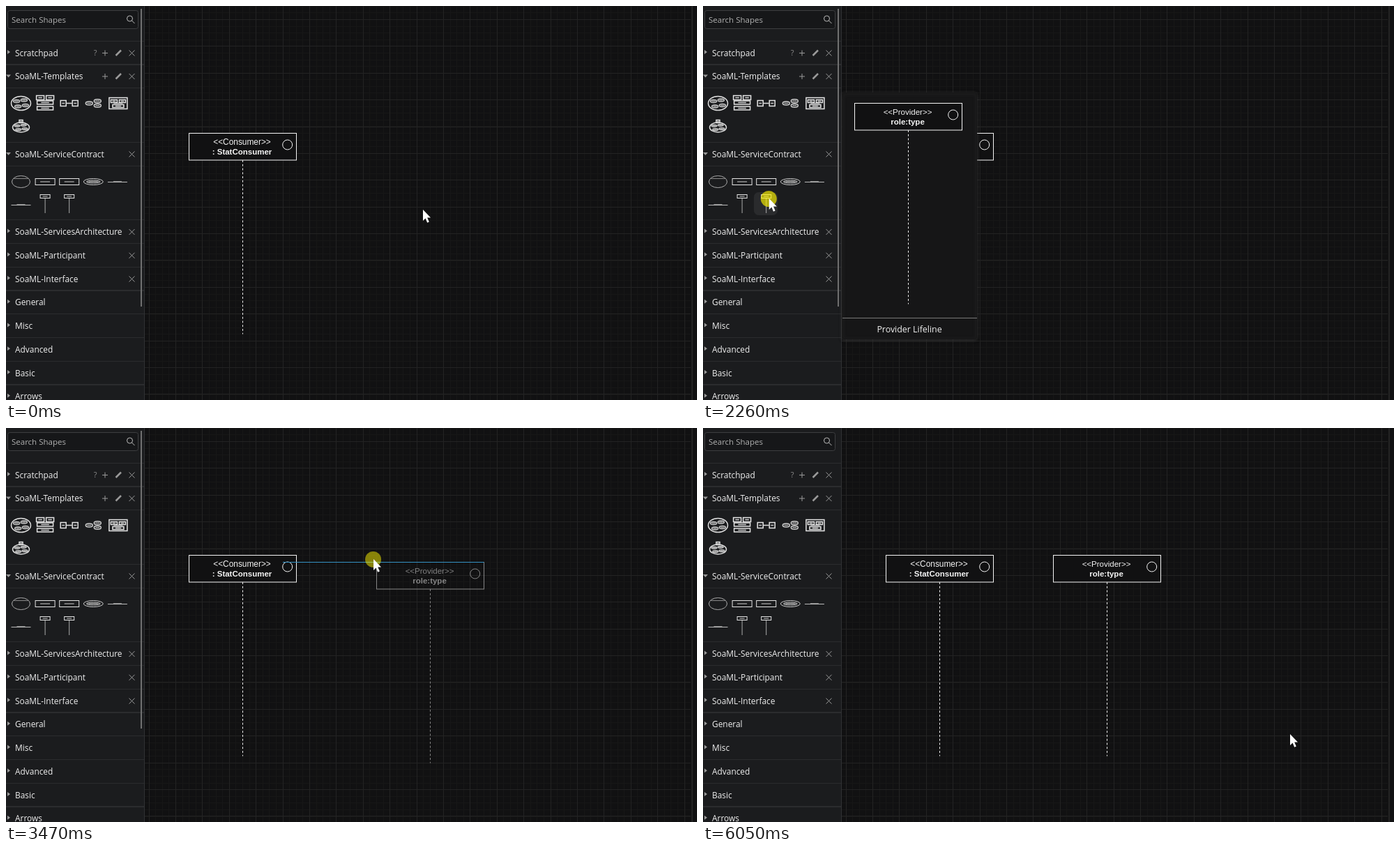
Animation of 991x565 px, one loop 7310 ms. Source, as an HTML page with a canvas:

```html
<!DOCTYPE html>
<html lang="en">
<head>
<meta charset="utf-8">
<style>
  html, body { margin: 0; width: 100%; height: 100%; overflow: hidden; background: #111; }
  canvas { display: block; }
</style>
</head>
<body>
<canvas id="stage" width="991" height="565"></canvas>
<script>
const ctx = document.getElementById('stage').getContext('2d');
const LOOP = 7310, GRID = 9.6, POPUP = 1730, PRESS = 2260, RELEASE = 5240, DESELECT = 5950;
const UI = '"Open Sans", "Noto Sans", sans-serif';
const DIAGRAM = '"Liberation Sans", Arial, sans-serif';
const INK = '#f4f4f4', DIM = '#9a9a9a', SELECT = '#29b6f2';

const linear = k => k;
const smooth = k => k * k * k * (k * (6 * k - 15) + 10);
const fastOut = k => 1 - (1 - k) ** 2.2;
const slowIn = k => k ** 1.5;

// Legs of motion: start, end, target x, target y, easing of x, easing of y
const pointerLegs = [
  [390, 1590, 94, 276, smooth],
  [PRESS, 3470, 527, 188, fastOut, slowIn],
  [3470, 3670, 543, 184, linear],
  [3740, 3930, 534, 184, linear],
  [4130, RELEASE, 497, 184, slowIn],
  [5420, 6050, 842, 439, smooth]
];
const ghostLegs = [
  [PRESS, 3470, 531.5, 192.3, fastOut, slowIn],
  [3470, 3670, 541.1, 182.7, linear],
  [4130, RELEASE, 502.7, 182.7, linear]
];

function travel(x, y, legs, t) {
  for (const [start, end, toX, toY, easeX, easeY = easeX] of legs) {
    const k = Math.min(1, Math.max(0, (t - start) / (end - start)));
    x += (toX - x) * easeX(k);
    y += (toY - y) * easeY(k);
  }
  return [x, y];
}

const snap = (v, origin) => origin + Math.round((v - origin) / GRID) * GRID;
const during = (t, start, end) => t >= start && t < end;

function rect(x, y, w, h, color) {
  ctx.fillStyle = color;
  ctx.fillRect(x, y, w, h);
}

function frame(x, y, w, h, color) {
  ctx.strokeStyle = color;
  ctx.strokeRect(x, y, w, h);
}

function panel(x, y, w, h, r, fill, stroke = fill) {
  ctx.beginPath();
  ctx.roundRect(x, y, w, h, r);
  ctx.fillStyle = fill;
  ctx.fill();
  ctx.strokeStyle = stroke;
  ctx.stroke();
}

function trace(pts) {
  ctx.beginPath();
  for (let i = 0; i < pts.length; i += 2) ctx.lineTo(pts[i], pts[i + 1]);
}

function line(color, ...pts) {
  trace(pts);
  ctx.strokeStyle = color;
  ctx.stroke();
}

function polygon(color, ...pts) {
  trace(pts);
  ctx.fillStyle = color;
  ctx.fill();
}

function oval(x, y, rx, ry, stroke, fill) {
  ctx.beginPath();
  ctx.ellipse(x, y, rx, ry, 0, 0, 7);
  if (fill) { ctx.fillStyle = fill; ctx.fill(); }
  if (stroke) { ctx.strokeStyle = stroke; ctx.stroke(); }
}

function label(str, x, y, font, color = '#f0f0f0', align = 'left') {
  ctx.font = font;
  ctx.fillStyle = color;
  ctx.textAlign = align;
  ctx.fillText(str, x, y);
}

function drawGrid() {
  rect(0, 0, 991, 565, '#111112');
  for (const [step, color] of [[GRID, '#171717'], [GRID * 4, '#232323']]) {
    for (let x = 205.1; x < 982; x += step) rect(Math.floor(x), 0, 1, 565, color);
    for (let y = 19.4 % step; y < 565; y += step) rect(199, Math.floor(y), 783, 1, color);
  }
  rect(983, 0, 2, 565, '#242424');
}

function drawHeader(name, y, tools = '', open = false) {
  for (const edge of [-17, 17]) rect(0, Math.floor(y + edge), 198, 1, '#2b2c2e');
  if (open) polygon(DIM, 0, y - 2, 7, y - 2, 3.5, y + 2);
  else polygon(DIM, 2, y - 4, 6, y - 1, 2, y + 2);
  label(name, 13, y + 4.5, '11.9px ' + UI);
  if (tools.includes('?')) label('?', 128, y + 4, '11px ' + UI, '#888', 'center');
  if (tools.includes('+')) {
    line(DIM, 138, y + .5, 146, y + .5);
    line(DIM, 142, y - 3.5, 142, y + 4.5);
    ctx.lineWidth = 2.5;
    line(DIM, 157.5, y + 4, 165, y - 3.5);
    ctx.lineWidth = 1;
  }
  if (tools.includes('x'))
    for (const d of [-4, 4]) line(DIM, 180.5 - d, y - 3.5, 180.5 + d, y + 4.5);
}

// Miniature of a text box, centred on x, y
function miniBox(x, y, w, h) {
  frame(x - w / 2, y - h / 2, w, h, '#e4e4e4');
  line('#ccc', x - w / 4, y, x + w / 4, y);
}

function miniOval(x, y, rx, ry) {
  oval(x, y, rx, ry, '#ccc');
  line('#aaa', x - rx * .6, y, x + rx * .6, y);
}

// Ellipse holding a ring of small linked bubbles
function cluster(x, y, rx, ry) {
  oval(x, y, rx, ry, '#ddd');
  for (let a = .6; a < 6; a += Math.PI / 2)
    miniOval(x + rx * .55 * Math.cos(a), y + ry * .55 * Math.sin(a), rx * .32, ry * .2);
}

function drawThumbnails() {
  const col = i => 21.5 + i * 34.6;
  ctx.lineWidth = 1.5;
  cluster(col(0), 139.5, 14, 10);
  cluster(col(0), 174, 12, 7);
  miniBox(col(0), 165.5, 5, 4);
  for (const side of [-1, 1]) {
    miniBox(col(1) + side * 7, 131.5, 11, 6);
    miniBox(col(1), 142.5 + side * 4, 23, 5);
    miniBox(col(2) + side * 8.5, 139.5, 8, 8);
    miniOval(col(3) + 6, 139.5 + side * 3.2, 5, 2.5);
    miniBox(col(4) + 1 + side * 6, 136.5, 9, 4);
  }
  line('#ddd', col(2) - 4, 139.5, col(2) + 4, 139.5);
  miniOval(col(3) - 6, 139.5, 5, 2.5);
  miniBox(col(4) + 1, 139.5, 26, 16);
  miniBox(col(4) + 1, 143.5, 16, 4);

  ctx.lineWidth = 1;
  oval(col(0), 252, 13, 8.5, '#aaa');
  line('#888', col(0) - 11, 247.5, col(0) + 11, 247.5);
  for (const i of [1, 2]) {
    miniBox(col(i), 252, 28, 9);
    miniBox(col(i), 273, 14, 5);
    line('#aaa', col(i), 276, col(i), 297);
  }
  miniOval(col(3), 252, 14, 4.5);
  miniOval(col(3), 252, 10, 2);
  for (const [x, y] of [[col(4), 252.5], [col(0), 285.5]]) {
    line('#bbb', x - 14, y, x + 14, y);
    line('#888', x - 6, y - 1, x + 6, y - 1);
  }
}

function drawSidebar(hover, scrollbar) {
  rect(0, 0, 198, 565, '#1b1c1e');
  rect(198, 0, 1, 565, '#303133');
  panel(2.5, 6.5, 187, 26, 3, '#161719', '#3d3e40');
  label('Search Shapes', 8, 24, '11.5px ' + UI, '#b0b0b0');
  oval(177.5, 18, 4, 4, '#bbb');
  line('#bbb', 180.5, 21, 184.5, 25);
  drawHeader('Scratchpad', 67, '?+x');
  drawHeader('SoaML-Templates', 100.5, '+x', true);
  drawHeader('SoaML-ServiceContract', 212, 'x', true);
  ['SoaML-ServicesArchitecture', 'SoaML-Participant', 'SoaML-Interface',
    'General', 'Misc', 'Advanced', 'Basic', 'Arrows'].forEach((name, i) =>
    drawHeader(name, 323.5 + i * 33.75, i < 3 ? 'x' : ''));
  if (hover) panel(73.5, 267.5, 33, 32, 6, '#2a2b2d');
  drawThumbnails();
  if (scrollbar) rect(193, 4, 2, 427, '#707070');
}

function drawLifeline(x, y, stereotype, name, size = 11.5, alpha = 1) {
  const left = Math.floor(x) + .5, top = Math.floor(y) + .5;
  ctx.save();
  ctx.globalAlpha = alpha;
  if (alpha === 1) rect(left, top, 154, 38.5, '#111112');
  frame(left, top, 154, 38.5, INK);
  oval(left + 141.2, top + 16.5, 7, 7, INK);
  label(`<<${stereotype}>>`, left + 76, top + 16, `${size}px ${DIAGRAM}`, INK, 'center');
  label(name, left + 76, top + 30.5, `bold 11.5px ${DIAGRAM}`, INK, 'center');
  ctx.setLineDash([GRID * .3, GRID * .3]);
  line(INK, left + 77, top + 38.6, left + 77, top + 288);
  ctx.restore();
}

const drawProvider = (x, y, alpha) => drawLifeline(x, y, 'Provider', 'role:type', 11.5, alpha);

function drawPreview() {
  ctx.save();
  ctx.shadowColor = 'rgba(70,70,70,.6)';
  ctx.shadowBlur = 5;
  ctx.shadowOffsetY = 1;
  panel(200, 124.5, 192.5, 353, 3, '#161617');
  ctx.restore();
  drawProvider(217, 139);
  rect(200, 447, 193, 1, '#777');
  label('Provider Lifeline', 296, 468, '12.4px ' + UI, '#f0f0f0', 'center');
}

function drawSelection(x, y) {
  ctx.setLineDash([3, 3]);
  frame(x, y, 153.6, 288, SELECT);
  ctx.setLineDash([]);
  for (let i = 0; i < 9; i++)
    if (i !== 4) oval(x + (i % 3) * 76.8, y + Math.floor(i / 3) * 144, 4.5, 4.5, '#111', SELECT);
}

function drawPointer(x, y) {
  ctx.save();
  ctx.translate(x, y);
  polygon('#fff', 0, 0, 0, 16, 3.6, 12.6, 6.2, 18.8, 8.8, 17.6, 6.2, 11.6, 11, 11.4);
  ctx.restore();
}

function drawDrag(px, t) {
  if (during(px, 262, 416)) {
    ctx.lineWidth = 4;
    frame(260.5, 180.5, 158, 291.5, '#7271e3');
    ctx.lineWidth = 1;
  }
  const [gx, gy] = travel(90, 272, ghostLegs, t);
  const x = snap(gx, 205.1), y = snap(gy, 182.7);
  drawProvider(x, y, .5);
  if (y < 184) rect(199, 470, 784, 1, '#a8620f');
  else if (y < 194) rect(397, 192, x + 154 - 397, 1, '#3592c4');
}

function draw(t) {
  const [px, py] = travel(598, 292, pointerLegs, t);
  const dragging = during(t, PRESS, RELEASE), started = PRESS + 70;
  const scrollbar = !during(t, 660, 1360) && t < RELEASE;
  drawGrid();
  drawLifeline(262, 182, 'Consumer', ': StatConsumer', 11.9);
  drawSidebar(t < started && px < 107, scrollbar);
  if (during(t, POPUP, started)) drawPreview();
  if (dragging && px > 199) drawDrag(px, t);
  if (t >= RELEASE) drawProvider(502, 182);
  if (during(t, RELEASE, DESELECT)) drawSelection(502.7, 182.7);
  if (dragging) oval(px - .5, py + .5, 11.5, 11.5, null, `rgba(255,245,0,${t < started ? .65 : .5})`);
  drawPointer(px, py);
}

function tick() {
  draw(performance.now() % LOOP);
  requestAnimationFrame(tick);
}
tick();
</script>
</body>
</html>
```
